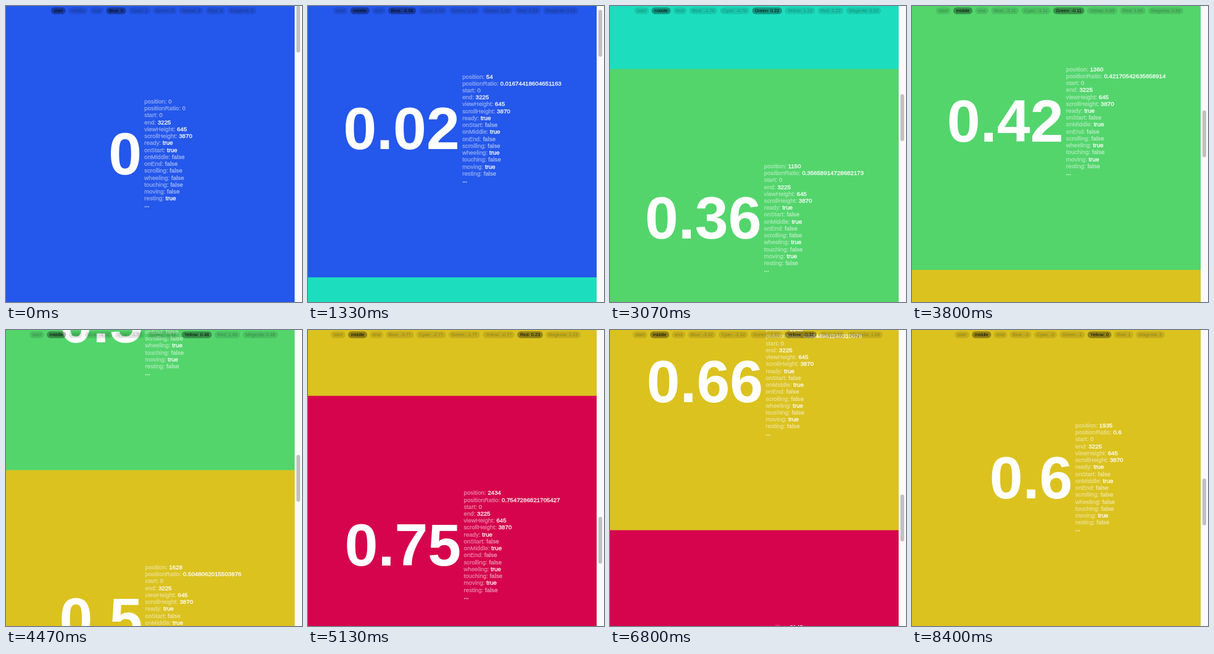
Write an HTML page with a canvas that moves like this. It is 480 px wide and 480 px high and loops after 8.47 s.

```html
<!DOCTYPE html>
<html lang="en">
<head>
<meta charset="utf-8">
<title>Scroll state</title>
<style>
html, body { margin: 0; width: 100%; height: 100%; overflow: hidden; background: #fafafa; }
canvas { display: block; width: 480px; height: 480px; }
</style>
</head>
<body>
<canvas id="stage" width="480" height="480"></canvas>
<script>
const ctx = document.getElementById('stage').getContext('2d');
const LOOP = 8470, LAST_STEP = 126;
const VIEW = 645, END = 3225, SCALE = 0.7488;
const FAMILY = '"Liberation Sans", Arial, sans-serif';
const NUMBER_FONT = `bold 97px ${FAMILY}`;
const DETAIL_FONT = `${13 * SCALE}px ${FAMILY}`;
const PILL_FONT = `${10 * SCALE}px ${FAMILY}`;
const ROW = 15 * SCALE, FIRST_ROW = 158;
const SECTIONS = [
  ['Blue', '#2457eb'], ['Cyan', '#1cdebe'], ['Green', '#53d56c'],
  ['Yellow', '#dbc21f'], ['Red', '#d6044c'], ['Magenta', '#c81fc8']
];

// Scroll position at given steps (15 steps per second).
const PATH = [
  [0, 0], [5, 150], [11, 0], [18, 0], [30, 847], [46, 1150], [67, 1628],
  [77, 2434], [87, 2560], [95, 2450], [102, 2143], [110, 2020], [122, 1937], [126, 1935]
];

const slope = i => (PATH[i + 1][1] - PATH[i][1]) / (PATH[i + 1][0] - PATH[i][0]);

function tangent(i) {
  if (i === 0 || i === PATH.length - 1) return 0;
  const a = slope(i - 1), b = slope(i);
  return a * b > 0 ? 2 * a * b / (a + b) : 0;
}

function positionAt(step) {
  let i = 0;
  while (i < PATH.length - 2 && step >= PATH[i + 1][0]) i++;
  const [x0, y0] = PATH[i], [x1, y1] = PATH[i + 1];
  const h = x1 - x0, u = (step - x0) / h, v = 1 - u;
  return Math.round(
    y0 * (1 + 2 * u) * v * v + y1 * u * u * (3 - 2 * u) +
    h * u * v * (tangent(i) * v - tangent(i + 1) * u));
}

const round2 = n => Math.round(n * 100) / 100 || 0;
const between = (n, a, b) => n >= a && n <= b;

function stateAt(step) {
  const position = positionAt(step);
  const moving = between(step, 1, 16) || step > 18;
  return {
    position,
    positionRatio: position / END,
    start: 0,
    end: END,
    viewHeight: VIEW,
    scrollHeight: END + VIEW,
    ready: true,
    onStart: position === 0,
    onMiddle: position > 0 && position < END,
    onEnd: position === END,
    scrolling: false,
    wheeling: between(step, 1, 12) || between(step, 19, 108),
    touching: false,
    moving,
    resting: !moving
  };
}

function textWidth(text, font) {
  ctx.font = font;
  return ctx.measureText(text).width;
}

function roundBox(x, y, w, h, color) {
  ctx.fillStyle = color;
  ctx.beginPath();
  ctx.roundRect(x, y, w, h, Math.min(w, h) / 2);
  ctx.fill();
}

// Slightly thickened white text.
function detailText(text, x, y, alpha) {
  ctx.save();
  ctx.globalAlpha = alpha;
  ctx.fillStyle = ctx.strokeStyle = '#fff';
  ctx.lineWidth = 0.3;
  ctx.fillText(text, x, y);
  ctx.strokeText(text, x, y);
  ctx.restore();
}

function drawContent(state, top) {
  const rows = Object.entries(state);
  const number = String(round2(state.positionRatio));
  const numberWidth = textWidth(number, NUMBER_FONT);
  const detailWidth = Math.max(...rows.map(([k, v]) => textWidth(`${k}: ${v}`, DETAIL_FONT)));
  const left = 235.2 - (numberWidth + detailWidth + 8) / 2;
  const detailLeft = left + numberWidth + 5;

  ctx.font = NUMBER_FONT;
  ctx.fillStyle = '#fff';
  ctx.fillText(number, left + 0.8, top + 272.6);

  ctx.font = DETAIL_FONT;
  rows.forEach(([key, value], i) => {
    const y = top + FIRST_ROW + i * ROW;
    const label = `${key}: `;
    detailText(label, detailLeft, y, 0.42);
    detailText(String(value), detailLeft + ctx.measureText(label).width, y, value ? 1 : 0.52);
  });
  detailText('...', detailLeft, top + FIRST_ROW + rows.length * ROW, 1);
}

function drawPills(state) {
  const pills = [['start', state.onStart], ['middle', state.onMiddle], ['end', state.onEnd]];
  SECTIONS.forEach(([name], i) => {
    const distance = i - state.position / VIEW;
    pills.push([`${name}: ${round2(distance)}`, Math.abs(distance) < 0.5]);
  });
  const pad = 6 * SCALE, gap = 6 * SCALE;
  const widths = pills.map(([text]) => textWidth(text, PILL_FONT) + 2 * pad);
  const total = widths.reduce((a, b) => a + b) + gap * (pills.length - 1);
  let x = 239.5 - total / 2;
  pills.forEach(([text, active], i) => {
    roundBox(x, 2.2, widths[i], 11, `rgba(0,0,0,${active ? 0.33 : 0.1})`);
    ctx.font = PILL_FONT;
    ctx.fillStyle = `rgba(0,0,0,${active ? 0.95 : 0.27})`;
    ctx.fillText(text, x + pad, 10.2);
    x += widths[i] + gap;
  });
}

function drawScrollbar(ratio) {
  ctx.fillStyle = '#fafafa';
  ctx.fillRect(468, 0, 12, 480);
  ctx.fillStyle = '#ececec';
  ctx.fillRect(468, 0, 1, 480);
  roundBox(471, ratio * 402 - 0.4, 6, 76, '#c1c1c1');
}

function draw(step) {
  const state = stateAt(step);
  ctx.clearRect(0, 0, 480, 480);
  SECTIONS.forEach(([, color], i) => {
    const top = (i * VIEW - state.position) * SCALE;
    if (Math.abs(top) > 483) return;
    ctx.fillStyle = color;
    ctx.fillRect(0, top - 2.6, 468, 485);
    drawContent(state, top);
  });
  drawPills(state);
  drawScrollbar(state.positionRatio);
}

function tick() {
  const time = performance.now() % LOOP;
  draw(Math.min(LAST_STEP, Math.floor(time * 0.015 + 0.06)));
  requestAnimationFrame(tick);
}
tick();
</script>
</body>
</html>
```
